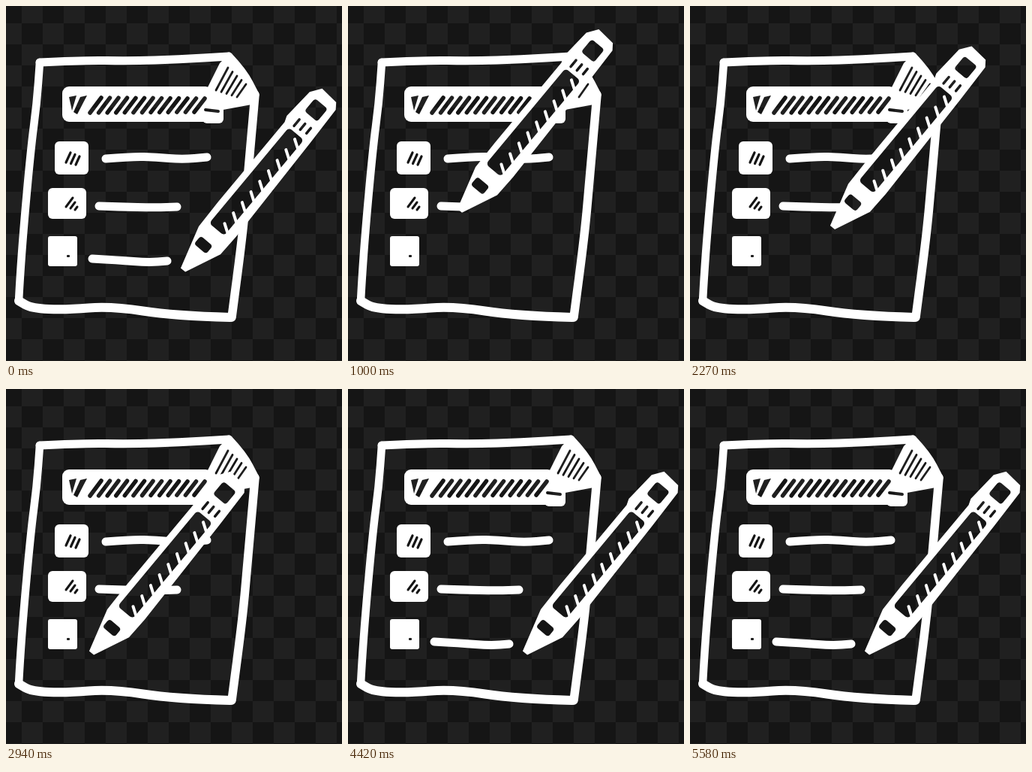
An HTML page with a canvas for the animation above (5670 ms loop, 448 by 472 pixels).

```html
<!DOCTYPE html>
<html lang="en">
<head>
<meta charset="utf-8">
<title>Checklist</title>
<style>
html, body { margin: 0; width: 100%; height: 100%; overflow: hidden; }
body { background: repeating-conic-gradient(#202020 0 25%, #151515 0 50%) 21px 23px / 56px 56px; }
canvas { display: block; }
</style>
</head>
<body>
<canvas id="stage" width="448" height="472"></canvas>
<script>
const ctx = document.getElementById('stage').getContext('2d');
const LOOP = 5670, STEP = LOOP / 68;
const LEAVE = 80, WRITE_2 = 500, DONE_2 = 2080, WRITE_3 = 2920, DONE_3 = 4270;
const TIP = { x: 236, y: 351 };
const TILT = Math.atan2(-229, 191);

// Pencil offset from rest: time, dx, dy
const path = [
  [LEAVE, 0, 0], [WRITE_2, -118, -78], [1180, -76, -79], [1500, -58, -70],
  [DONE_2, -17, -78], [2700, -122, 0], [WRITE_3, -122, 0], [3670, -58, 10], [DONE_3, 0, 0]
];

const rows = [
  [[133, 203], [168, 200], [200, 201], [235, 204], [268, 201]],
  [[124, 266], [150, 267], [200, 268], [228, 267]],
  [[115, 336], [150, 338], [190, 341], [215, 339]]
];

const mix = (a, b, k) => a + (b - a) * k;

const white = () => { ctx.globalCompositeOperation = 'source-over'; };
const erase = () => { ctx.globalCompositeOperation = 'destination-out'; };

function curve(points, width) {
  ctx.lineWidth = width;
  ctx.beginPath();
  ctx.moveTo(...points[0]);
  for (let i = 1; i < points.length - 1; i++) {
    const [x, y] = points[i], [nx, ny] = points[i + 1];
    ctx.quadraticCurveTo(x, y, (x + nx) / 2, (y + ny) / 2);
  }
  ctx.lineTo(...points[points.length - 1]);
  ctx.stroke();
}

function shape(points) {
  ctx.beginPath();
  points.forEach(p => ctx.lineTo(...p));
  ctx.fill();
}

function block(x, y, w, h, r) {
  ctx.beginPath();
  ctx.roundRect(x, y, w, h, r);
  ctx.fill();
}

// Slanted strokes spread evenly between a first and a last one
function hatch(first, last, count, width) {
  for (let i = 0; i < count; i++) {
    const [x1, y1, x2, y2] = first.map((v, j) => mix(v, last[j], i / (count - 1)));
    curve([[x1, y1], [x2, y2]], width);
  }
}

function drawPaper() {
  white();
  curve([[45, 75], [100, 72], [168, 73], [230, 71], [297, 67]], 11);
  curve([[297, 67], [316, 87], [332, 118]], 11);
  curve([[332, 118], [322, 230], [316, 300], [301, 414]], 11.5);
  curve([[299, 414], [225, 412], [140, 399], [80, 404], [34, 402], [17, 392]], 12);
  curve([[17, 392], [20, 335], [33, 190], [41, 130], [45, 75]], 10.5);
  shape([[297, 64], [318, 88], [336, 118], [333, 130], [284, 139], [268, 110], [285, 76]]);
  erase();
  hatch([296, 82, 280, 112], [320, 104, 308, 121], 5, 2.8);
}

function drawBar() {
  white();
  block(75, 107, 200, 47, 9);
  block(262, 118, 28, 38, 6);
  erase();
  shape([[84, 121], [94, 119], [88, 139]]);
  shape([[99, 121], [108, 119], [95, 144], [90, 141]]);
  hatch([112, 142, 127, 122], [251, 141, 265, 123], 13, 5.5);
  curve([[266, 138], [283, 140]], 4);
}

function drawBoxes() {
  white();
  block(65, 180, 45, 44, 6);
  block(56, 242, 51, 41, 6);
  block(56, 306, 39, 40, 3);
  erase();
  hatch([80, 208, 86, 195], [93, 211, 98, 200], 3, 3.2);
  hatch([80, 267, 89, 255], [92, 271, 95, 267], 3, 3);
  block(81, 331, 4, 3, 1);
}

function drawRow(points, limit) {
  white();
  ctx.save();
  ctx.beginPath();
  ctx.rect(0, 0, limit, 472);
  ctx.clip();
  curve(points, 11);
  ctx.restore();
}

// Drawn along its own axis, with the tip at the origin
function drawPencil(dx, dy) {
  ctx.save();
  ctx.translate(TIP.x + dx, TIP.y + dy);
  ctx.rotate(TILT);
  white();
  shape([[0, -4], [58, -21], [100, -22], [238, -22], [246, -25], [290, -22], [304, -12],
    [302, 14], [294, 20], [240, 22], [80, 26], [48, 25], [0, 4]]);
  erase();
  block(70, -13, 166, 26, 5);
  block(36, -11, 14, 21, 4);
  block(266, -11, 22, 22, 4);
  hatch([242, -9, 253, -9], [245, 10, 254, 10], 3, 3.5);
  white();
  hatch([76, 14, 83, 3], [222, 14, 229, 3], 9, 4);
  ctx.restore();
}

function pencilAt(t) {
  const i = path.findIndex(p => p[0] > t);
  if (i < 1) return [0, 0];
  const [t0, x0, y0] = path[i - 1], [t1, x1, y1] = path[i];
  const k = (t - t0) / (t1 - t0);
  return [mix(x0, x1, k), mix(y0, y1, k)];
}

function draw(t) {
  const [dx, dy] = pencilAt(t);
  const nib = TIP.x + dx + 4;
  const reach = (from, to) => t < LEAVE || t >= to ? 448 : t > from ? nib : 0;

  white();
  ctx.clearRect(0, 0, 448, 472);
  ctx.fillStyle = ctx.strokeStyle = '#fff';
  ctx.lineCap = ctx.lineJoin = 'round';

  drawPaper();
  drawBar();
  drawBoxes();
  drawRow(rows[0], 448);
  drawRow(rows[1], reach(WRITE_2, DONE_2));
  drawRow(rows[2], reach(WRITE_3, DONE_3));
  drawPencil(dx, dy);
}

const start = performance.now();
function tick() {
  const t = (performance.now() - start) % LOOP;
  draw(Math.floor(t / STEP) * STEP);
  requestAnimationFrame(tick);
}
tick();
</script>
</body>
</html>
```
